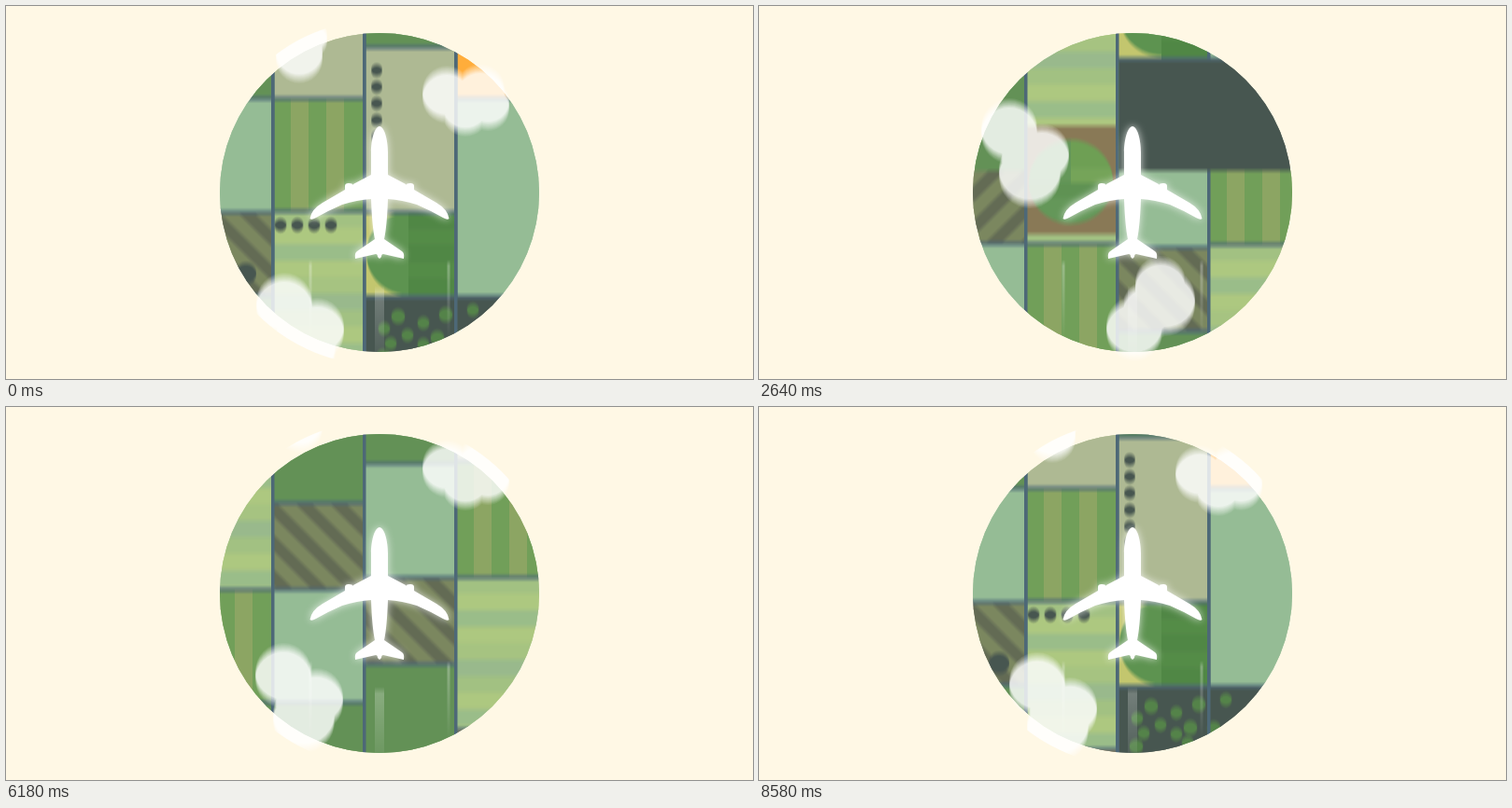
An HTML page with a canvas for the animation above (8.64 s loop, 800 by 400 pixels).

```html
<!DOCTYPE html>
<html lang="en">
<head>
<meta charset="utf-8">
<title>Flight over fields</title>
<style>
html, body { margin: 0; width: 100%; height: 100%; overflow: hidden; background: #fff8e5; }
canvas { display: block; }
</style>
</head>
<body>
<canvas id="stage" width="800" height="400"></canvas>
<script>
const LOOP = 8640, STEP = 60;
const LAND = 1740;            // height of the endless map
const WIND = 0.385;           // cloud speed, px per ms
const LEFT = 189, COL = 98;
const LINE = '#4f6a78', DARK = '#4a5852';
const TAU = Math.PI * 2;

function layer(w, h) {
  const c = document.createElement('canvas');
  c.width = w;
  c.height = h;
  return c.getContext('2d');
}
const ctx = document.getElementById('stage').getContext('2d');
const map = layer(800, LAND);
const sky = layer(800, 400);

function disc(g, x, y, r, color) {
  g.fillStyle = color;
  g.beginPath();
  g.arc(x, y, r, 0, TAU);
  g.fill();
}

function rect(g, x, y, w, h, color) {
  g.fillStyle = color;
  g.fillRect(x, y, w, h);
}

// Each painter fills one field whose top left corner is at 0,0.
const flat = color => (g, h) => rect(g, 0, 0, COL, h, color);

function rows(g, h) {
  rect(g, 0, 0, COL, h, '#99b872');
  for (const x of [19, 57]) rect(g, x, 0, 19, h, '#8da664');
  for (const x of [0, 38, 76]) rect(g, x, 0, x === 76 ? 22 : 19, h, '#739f5b');
}

function bands(g, h) {
  const tones = ['#a3c183', '#aec880', '#9dbe8b', '#aec880', '#a7c482', '#9abb8d'];
  const step = 17.7;
  for (let i = 0; i * step < h; i++) rect(g, 0, i * step, COL, step + 0.5, tones[i % 6]);
}

function furrows(g, h, flip) {
  rect(g, 0, 0, COL, h, '#646c57');
  if (flip) {
    g.translate(COL, 0);
    g.scale(-1, 1);
  }
  g.strokeStyle = '#7c8762';
  g.lineWidth = 14;
  for (let x = -98; x < 110; x += 37) {
    g.beginPath();
    g.moveTo(x - 20, -20);
    g.lineTo(x + h + 20, h + 20);
    g.stroke();
  }
}

function pivot(g, h, mid = 60) {
  rect(g, 0, 0, COL, h, '#8b7b58');
  disc(g, 48, mid, 45, '#66985a');
  g.beginPath();
  g.arc(48, mid, 45, 0, TAU);
  g.clip();
  rect(g, 48, mid - 45, 50, 30, '#70a057');
  rect(g, 48, mid - 15, 50, 16, '#77a55a');
  rect(g, 0, mid + 1, COL, 16, '#609356');
}

function halfPivot(g, h) {
  rect(g, 0, 0, COL, h, '#c3c66f');
  disc(g, 47, h / 2, 45, '#5f9453');
  for (let i = 0; i < 5; i++) {
    rect(g, 47, i * h / 5, 51, h / 5 + 0.5, i % 2 ? '#578c4a' : '#528747');
  }
}

const green = flat('#649258'), pale = flat('#97bd97');
const beige = flat('#afbb94'), amber = flat('#ffae3d');

// Per column: start height, then [top, painter, option] going up.
const columns = [
  [-310, [-221, furrows], [-99, pale], [156, green], [277, pale], [355, furrows, true],
    [477, green], [571, furrows], [692, pale], [928, green], [1049, rows],
    [1211, bands], [1313, pivot, 40], [1430, green]],
  [-379, [-220, bands], [-99, rows], [35, beige], [156, beige], [277, rows], [287, bands],
    [403, pivot], [571, bands], [692, rows], [827, beige], [928, green], [1049, pale],
    [1142, furrows], [1241, green], [1361, pivot]],
  [-310, [-221, halfPivot], [-44, beige], [183, green], [273, furrows], [355, pale],
    [475, green], [571, halfPivot], [746, beige], [969, green], [1062, furrows],
    [1184, pale], [1308, green]],
  [-310, [-99, pale], [-6, amber], [113, pivot], [116, amber], [276, bands], [355, rows],
    [475, green], [692, pale], [781, amber], [899, pivot], [1062, bands],
    [1187, rows], [1308, beige]]
];
const seams = [287, 403, 113, 116, 355];   // edges without a track

const grove = [[420, 333], [405, 346], [447, 340], [471, 331], [500, 326], [430, 353],
  [462, 356], [412, 362], [447, 363], [487, 357], [459, 372], [490, 392], [404, 376]];

function drawLand() {
  columns.forEach(([start, ...fields], c) => {
    const x = LEFT + c * COL - 1;
    let low = start;
    for (const [top, paint, option] of fields) {
      const h = top - low;
      map.save();
      map.beginPath();
      map.rect(x, -top, COL, h);
      map.clip();
      map.translate(x, -top);
      paint(map, h, option);
      map.restore();
      low = top;
    }
    for (const [top] of fields) {
      if (!seams.includes(top)) rect(map, x, -top - 1.5, COL, 3.5, LINE);
    }
  });
  for (const x of [284, 382, 480]) rect(map, x, -LAND, 3.5, LAND * 2, LINE);
  for (const [low, top] of [[-432, -312], [355, 473]]) {
    rect(map, 385.5, -top, 200, top - low, DARK);
  }
  rect(map, 385, 310, 200, 3.5, LINE);
  grove.forEach(([x, y], i) => disc(map, x, y, i % 3 ? 6.5 : 7.5, '#57854b'));
  for (let i = 0; i < 6; i++) disc(map, 397, 69 + i * 17.8, 6, DARK);
  for (let i = 0; i < 4; i++) disc(map, 294 + i * 18, 235, 6.5, DARK);
  disc(map, 257, 287, 11, DARK);
}

for (const shift of [0, LAND]) {
  map.save();
  map.translate(0, shift);
  drawLand();
  map.restore();
}

const shapes = {
  wide: [[26, 28, 26], [62, 26, 26], [46, 43, 25], [70, 39, 23]],
  tall: [[30, 31, 30], [65, 57, 29], [52, 76, 33], [45, 50, 25]],
  lean: [[58, 28, 27], [63, 45, 32], [45, 55, 28], [30, 74, 30]],
  puff: [[18, 18, 17], [38, 30, 18], [26, 49, 25]],
  edge: [[37, 25, 25], [25, 52, 25], [62, 38, 20], [60, 72, 22]]
};

// [time, x, y at that time, shape]
const clouds = [
  [0, 446, 67, 'wide'], [0, 268, 290, 'tall'], [0, 288, 4, 'puff'],
  [900, 490, 190, 'wide'],
  [1800, 390, 270, 'puff'], [1800, 510, 193, 'edge'],
  [2640, 238, 103, 'tall'], [2640, 372, 272, 'lean'],
  [3300, 300, 180, 'wide'],
  [4080, 267, 97, 'wide'], [4080, 320, 150, 'puff'], [4080, 465, 43, 'puff'],
  [4080, 480, 95, 'wide'], [4080, 447, 322, 'lean'],
  [5200, 380, 150, 'wide'],
  [6180, 446, 38, 'wide'], [6180, 267, 257, 'tall'], [6180, 288, -30, 'puff'],
  [6900, 300, 190, 'wide'],
  [7620, 375, 158, 'wide'], [7620, 219, 105, 'puff']
];

function drawClouds(t) {
  const samples = 10;
  sky.globalCompositeOperation = 'source-over';
  sky.clearRect(0, 0, 800, 400);
  sky.globalCompositeOperation = 'lighter';
  sky.fillStyle = `rgba(255,255,255,${0.82 / samples})`;
  for (const [at, x, y, shape] of clouds) {
    const dt = (t - at + LOOP * 1.5) % LOOP - LOOP / 2;
    const top = y + dt * WIND;
    if (top < -130 || top > 410) continue;
    for (let i = 0; i < samples; i++) {
      const dy = top + (i - (samples - 1) / 2) * 1.1;
      sky.beginPath();
      for (const [bx, by, r] of shapes[shape]) {
        sky.moveTo(x + bx + r, dy + by);
        sky.arc(x + bx, dy + by, r, 0, TAU);
      }
      sky.fill();
    }
  }
}

function inCircle(r, draw) {
  ctx.save();
  ctx.beginPath();
  ctx.arc(400, 200, r, 0, TAU);
  ctx.clip();
  draw();
  ctx.restore();
}

function trail(x, y, w, h, alpha) {
  const fade = ctx.createLinearGradient(0, y, 0, y + h);
  fade.addColorStop(0, 'rgba(255,255,255,0)');
  fade.addColorStop(0.08, `rgba(255,255,255,${alpha})`);
  fade.addColorStop(1, 'rgba(255,255,255,0)');
  rect(ctx, x - w / 2, y, w, h, fade);
}

const half = 'M0 129C5 129 9 143 9 157V181L28 191V192Q29 190 33 190Q37 190 37 193V197' +
  'L61 211Q73 218 74.500 228Q73 230 68 227Q54 219 40 213Q24 208 9 207Q8 236 5 250' +
  'L24 263Q27 265 26 271L4 266Q2 266 2 269L0 271Z';
const plane = new Path2D(half);
plane.addPath(new Path2D(half), new DOMMatrix([-1, 0, 0, 1, 0, 0]));

function drawPlane() {
  ctx.save();
  ctx.translate(400, 0);
  ctx.fillStyle = '#fff';
  ctx.shadowColor = 'rgba(255,255,255,.75)';
  ctx.shadowBlur = 9;
  ctx.fill(plane);
  ctx.restore();
}

function draw(t) {
  const s = t / LOOP * LAND;
  rect(ctx, 0, 0, 800, 400, '#fff8e5');
  inCircle(171, () => {
    // averaged copies give the vertical motion blur
    for (let i = 0; i < 6; i++) {
      ctx.globalAlpha = 1 / (i + 1);
      const y = s + (i - 2.5) * 1.1;
      ctx.drawImage(map.canvas, 0, y - LAND);
      ctx.drawImage(map.canvas, 0, y);
    }
    ctx.globalAlpha = 1;
    trail(326, 272, 3, 85, 0.28);
    trail(474, 272, 3, 85, 0.28);
    trail(400, 300, 10, 95, 0.24);
  });
  drawClouds(t);
  inCircle(185, () => ctx.drawImage(sky.canvas, 0, 0));
  drawPlane();
}

const begin = performance.now();
function tick() {
  const t = (performance.now() - begin) % LOOP;
  draw(Math.floor(t / STEP) * STEP);
  requestAnimationFrame(tick);
}
tick();
</script>
</body>
</html>
```
